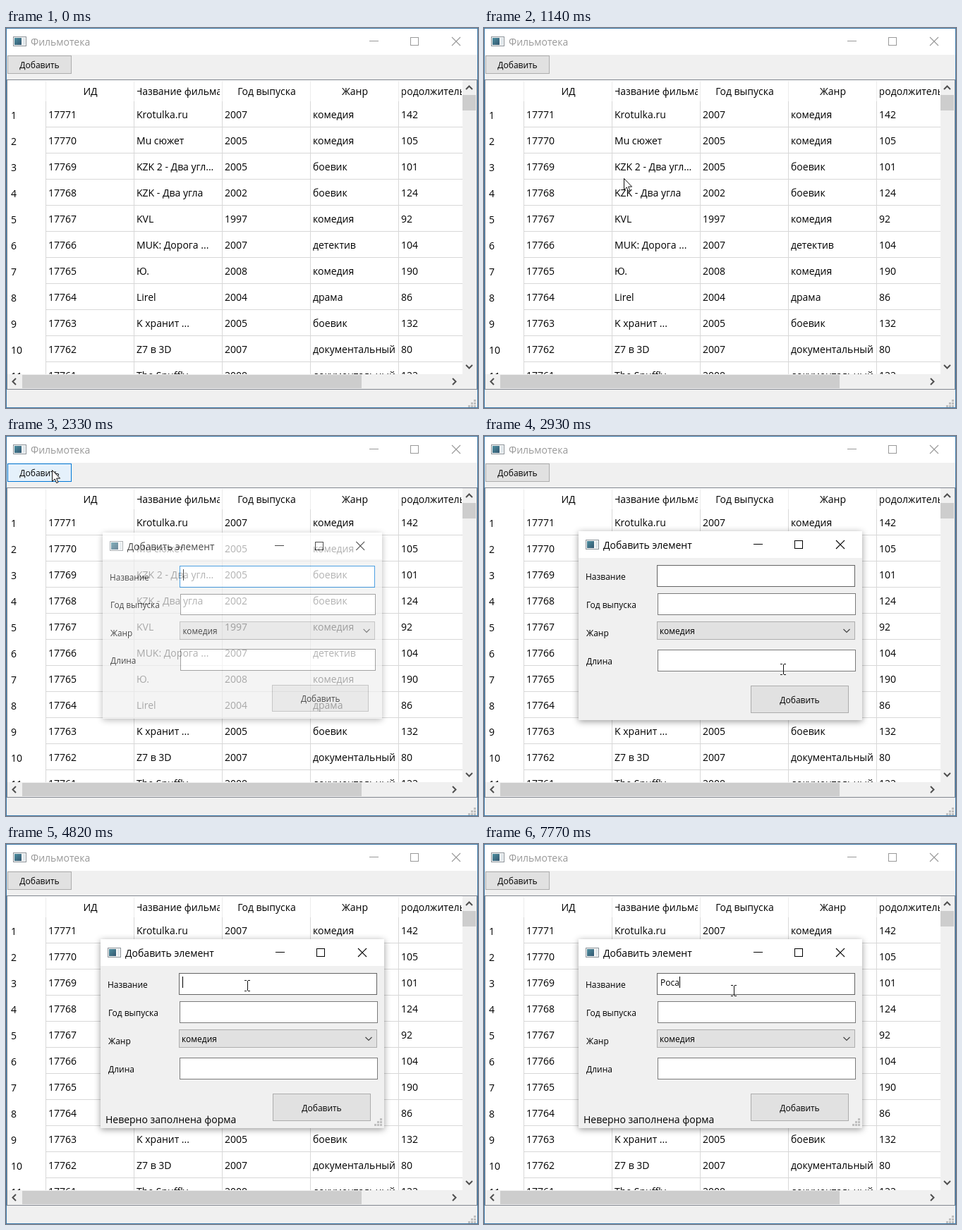
Write an HTML page that moves like this. It is 669 by 539 pixels and loops after 8 s.

```html
<!DOCTYPE html>
<html lang="ru">
<head>
<meta charset="utf-8">
<title>Фильмотека</title>
<style>
  html, body { margin: 0; width: 100%; height: 100%; overflow: hidden; background: #fff; }
  svg { display: block; width: 669px; height: 539px; }
  text { font: 14px "Open Sans", "Noto Sans", sans-serif; white-space: pre; }
  text.small { font-size: 12px; }
  rect, .crisp { shape-rendering: crispEdges; }
  #dialog { transform-origin: 335px 269px; }
  #dialog > .frame { filter: drop-shadow(0 2px 5px rgba(0, 0, 0, .4)); }
</style>
</head>
<body>
<script>
const LOOP = 8000;
const ROW = 37;
const BLINK = 525;
const FIRST_ID = 17771;
const colX = i => 56 + 125 * i;
const HEADS = ['ИД', 'Название фильма', 'Год выпуска', 'Жанр', 'Продолжительность'];
const FILMS = [
  'Krotulka.ru|2007|комедия|142',
  'Mu сюжет|2005|комедия|105',
  'KZK 2 - Два угл...|2005|боевик|101',
  'KZK - Два угла|2002|боевик|124',
  'KVL|1997|комедия|92',
  'MUK: Дорога ...|2007|детектив|104',
  'Ю.|2008|комедия|190',
  'Lirel|2004|драма|86',
  'K хранит ...|2005|боевик|132',
  'Z7 в 3D|2007|документальный|80',
  'The Snuffly ...|2008|документальный|122',
  'HyperТыквы|2007|комедия|114',
  'Plunk-on|2000|драма|125',
  'Mud Gliders|2008|приключения|121',
  'Morvunda Clouds|2005|драма|120',
  'Q.L.U.M. Патру...|2003|боевик|117',
  'Gardener и его...|1996|мелодрама|91'
];
const TYPED = 'Роса';

const ENTER = 200;
const ADD_CLICK = 2150;
const OPEN = 2240;
const SUBMIT_CLICK = 3480;
const REFOCUS = 4615;
const WHEEL_DOWN = [820, 900];
const WHEEL_UP = [1070, 1140];
const KEYS = [5990, 6140, 6690, 6910];
const FIELDS = [183, 223, 303];

// Pointer moves: from, to (ms), then the place it eases to.
const POINTER_START = [262, 477];
const MOVES = [
  [200, 660, 198, 213],
  [1300, 1770, 88, 0],
  [1770, 2000, 65, 45],
  [2100, 2150, 65, 48],
  [2400, 2930, 424, 331],
  [2940, 3400, 443, 371],
  [3960, 4650, 342, 201],
  [4820, 4970, 354, 208]
];

function el(parent, tag, attrs = {}, content) {
  const node = document.createElementNS('http://www.w3.org/2000/svg', tag);
  for (const key in attrs) node.setAttribute(key, attrs[key]);
  if (content !== undefined) node.textContent = content;
  parent.appendChild(node);
  return node;
}
const group = (p, attrs) => el(p, 'g', attrs);
const fill = (p, x, y, width, height, color) => el(p, 'rect', { x, y, width, height, fill: color });
const box = (p, x, y, w, h, color, stroke) =>
  el(p, 'rect', { x: x + .5, y: y + .5, width: w - 1, height: h - 1, fill: color, stroke });
const label = (p, x, y, text, attrs = {}) => el(p, 'text', { x, y, ...attrs }, text);
const line = (p, d, stroke, width = 1) =>
  el(p, 'path', { d, fill: 'none', stroke, 'stroke-width': width });

const svg = el(document.body, 'svg', { viewBox: '0 0 669 539' });
const defs = el(svg, 'defs');

function clipped(parent, id, x, y, width, height) {
  el(el(defs, 'clipPath', { id }), 'rect', { x, y, width, height });
  return group(parent, { 'clip-path': `url(#${id})` });
}

const shade = el(defs, 'linearGradient', { id: 'shade', x2: 1, y2: 1 });
el(shade, 'stop', { offset: 0, 'stop-color': '#4d8fa0' });
el(shade, 'stop', { offset: 1, 'stop-color': '#33566f' });

function titleBar(p, x, y, text, color, mid) {
  box(p, x, y, 19, 14, '#f8f8f8', '#8c9399');
  fill(p, x + 2, y + 2, 10, 10, 'url(#shade)');
  fill(p, x + 14, y + 2, 3, 10, '#dfe6ea');
  label(p, x + 25, y + 13, text, { fill: color });
  fill(p, mid - 64, y + 6, 13, 1, color);
  box(p, mid - 6, y + 1, 12, 12, 'none', color);
  line(p, `M${mid + 53} ${y + 1}l12 12m0-12l-12 12`, color, 1.1);
}

function grip(p, x, y) {
  for (let i = 0; i < 3; i++)
    for (let j = 2 - i; j < 3; j++) fill(p, x + j * 4, y + i * 4, 3, 3, '#bfbfbf');
}

const LOOKS = {
  normal: ['#e1e1e1', '#adadad'],
  hover: ['#e5f1fb', '#0078d7'],
  pressed: ['#cce4f7', '#005499']
};
function button(p, x, y, w, h, textY) {
  const face = box(p, x, y, w, h, ...LOOKS.normal);
  label(p, x + w / 2, textY, 'Добавить', { class: 'small', 'text-anchor': 'middle' });
  return (pressed, hover) => {
    const [color, stroke] = LOOKS[pressed ? 'pressed' : hover ? 'hover' : 'normal'];
    face.setAttribute('fill', color);
    face.setAttribute('stroke', stroke);
  };
}

// Main window
fill(svg, 0, 0, 669, 539, '#f0f0f0');
fill(svg, 1, 1, 667, 37, '#fff');
titleBar(svg, 10, 12, 'Фильмотека', '#999', 579);
const paintAdd = button(svg, 2, 39, 91, 26, 57);
box(svg, 1, 73, 667, 440, '#fff', '#828790');

HEADS.forEach((head, i) => {
  const x = colX(i);
  const g = clipped(svg, 'head' + i, x + 5, 75, Math.min(117, 641 - x), 29);
  label(g, x + 63.5, 95, head, { 'text-anchor': 'middle' });
  fill(svg, x, 75, 1, 29, '#ececec');
});

const view = clipped(svg, 'view', 2, 104, 645, 387);
const rows = group(view);
FILMS.forEach((film, i) => {
  const y = 128 + i * ROW;
  label(rows, 7, y + 1, i + 1);
  [FIRST_ID - i, ...film.split('|')].forEach((text, c) => label(rows, colX(c) + 4, y, text));
  fill(rows, 57, y + 12, 590, 1, '#d8d8d8');
});
HEADS.forEach((_, i) => fill(view, colX(i), 104, 1, 387, '#d8d8d8'));

// Scroll bars
fill(svg, 647, 74, 20, 438, '#f0f0f0');
fill(svg, 2, 491, 665, 21, '#f0f0f0');
fill(svg, 647, 95, 19, 22, '#cdcdcd');
fill(svg, 23, 492, 481, 19, '#cdcdcd');
line(svg, 'M652 87l4.5-4.5 4.5 4.5M652 478l4.5 4.5 4.5-4.5M14 497l-4.5 4.5 4.5 4.5M633 497l4.5 4.5-4.5 4.5',
  '#505050', 2);
grip(svg, 655, 527);
box(svg, 0, 0, 669, 539, 'none', '#3f7cac');

// Dialog
const dialog = group(svg, { id: 'dialog' });
fill(dialog, 134, 135, 402, 268, '#f0f0f0').setAttribute('class', 'frame');
fill(dialog, 134, 135, 402, 38, '#fff');
titleBar(dialog, 144, 147, 'Добавить элемент', '#000', 446);
['Название', 'Год выпуска', 'Жанр', 'Длина']
  .forEach((text, i) => label(dialog, i ? 145 : 144, 204 + 40 * i, text, { class: 'small' }));
const inputs = FIELDS.map((y, i) => box(dialog, i ? 246 : 245, y, 281, 31, '#fff', '#7a7a7a'));
box(dialog, 245, 263, 281, 26, ...LOOKS.normal);
label(dialog, 249, 281, 'комедия', { class: 'small' });
line(dialog, 'M509.5 274l4.5 4.5 4.5-4.5', '#444', 1.2);
const paintSubmit = button(dialog, 378, 354, 139, 39, 379);
const entry = label(dialog, 250, 201, '', { class: 'small' });
const caret = fill(dialog, 250, 188, 1, 16, '#000');
const notice = group(dialog);
label(notice, 141, 396, 'Неверно заполнена форма');
grip(notice, 522, 389);

// Pointers
const arrow = el(svg, 'path', {
  d: 'M.5.5v16l3.7-3.5 2.4 5.6 2.4-1-2.4-5.5h5z', fill: '#fff', stroke: '#111'
});
const beam = el(svg, 'path', {
  class: 'crisp', d: 'M-4-7.5h3m2 0h3M.5-7v14M-4 7.5h3m2 0h3', fill: 'none', stroke: '#111'
});

const clamp = u => Math.min(1, Math.max(0, u));
const smooth = u => u * u * (3 - 2 * u);
const passed = (times, t) => times.filter(time => time <= t).length;
const during = (t, from, length) => t >= from && t < from + length;
const within = (x, y, left, top, w, h) => x >= left && x < left + w && y >= top && y < top + h;
const show = (node, on) => { node.style.display = on ? '' : 'none'; };
const move = (node, x, y) => node.setAttribute('transform', `translate(${x} ${y})`);

function pointerAt(t) {
  let [x, y] = POINTER_START;
  for (const [from, to, toX, toY] of MOVES) {
    const u = smooth(clamp((t - from) / (to - from)));
    x += (toX - x) * u;
    y += (toY - y) * u;
  }
  return [Math.round(x), Math.round(y)];
}

function caretOn(t) {
  if (t >= SUBMIT_CLICK && t < REFOCUS) return false;
  const focus = t < REFOCUS ? OPEN : REFOCUS;
  return Math.floor((t - focus) / BLINK) % 2 === 0;
}

function draw(t) {
  const [x, y] = pointerAt(t);
  const opening = clamp((t - OPEN) / 200);
  const opacity = 1 - (1 - opening) ** 2;
  const open = opening === 1;
  const overText = open && FIELDS.some(top => within(x, y, 245, top, 281, 31));

  move(rows, 0, -3 * ROW * (passed(WHEEL_DOWN, t) - passed(WHEEL_UP, t)));
  move(arrow, x, y);
  move(beam, x, y);
  show(arrow, t >= ENTER && !overText);
  show(beam, overText);
  paintAdd(during(t, ADD_CLICK, 80), !open && within(x, y, 2, 39, 91, 26));
  paintSubmit(during(t, SUBMIT_CLICK, 70), open && within(x, y, 378, 354, 139, 39));

  show(dialog, opacity > 0);
  dialog.style.opacity = opacity;
  dialog.style.transform = open ? 'none' : `scale(${1 - .055 * (1 - opacity)})`;
  inputs[0].setAttribute('stroke', open ? '#646464' : '#0078d7');
  show(notice, t >= SUBMIT_CLICK + 70);

  const count = passed(KEYS, t);
  entry.textContent = TYPED.slice(0, count);
  caret.setAttribute('x', 250 + (count ? Math.round(entry.getComputedTextLength()) : 0));
  show(caret, caretOn(t));
}

const start = performance.now();
function tick() {
  draw((performance.now() - start) % LOOP);
  requestAnimationFrame(tick);
}
tick();
</script>
</body>
</html>
```
